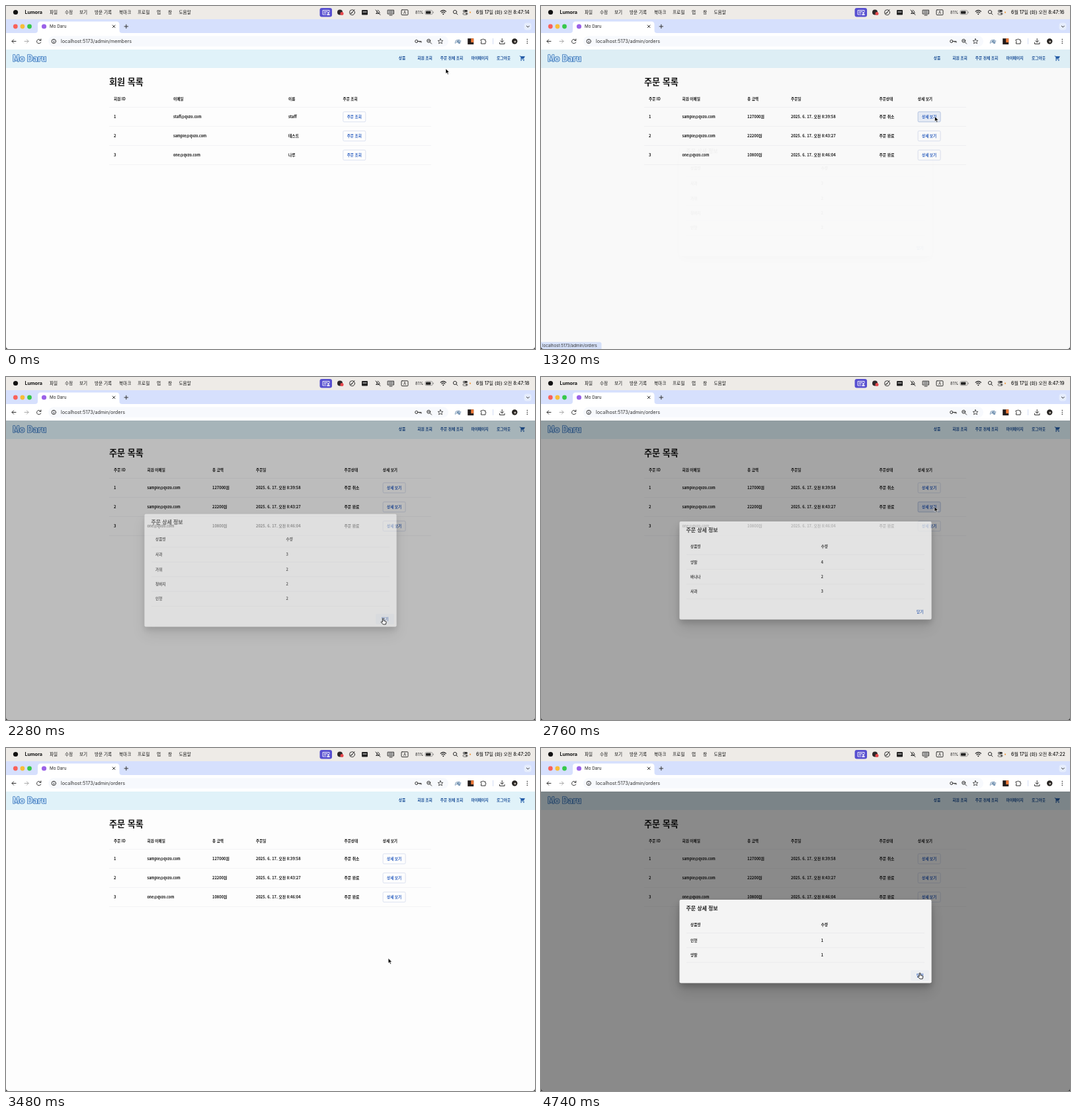
Write an HTML page that moves like this. It is 800 by 520 pixels and loops after 4800 ms.

```html
<!DOCTYPE html>
<html lang="ko">
<head>
<meta charset="utf-8">
<title>Mo Daru</title>
<style>
  html, body { margin: 0; width: 800px; height: 520px; overflow: hidden; background: #fdfdfd; }
  svg { display: block; }
  text { font-family: Inter, "Noto Sans CJK KR", "Noto Sans CJK", sans-serif; white-space: pre; }
  .page text { font-family: "Noto Sans CJK KR", "Noto Sans CJK", sans-serif; font-weight: 700; }
  .line { fill: none; stroke: #333; stroke-width: 1; stroke-linecap: round; stroke-linejoin: round; }
</style>
</head>
<body>
<svg id="stage" width="800" height="520" viewBox="0 0 800 520"></svg>
<script>
const LOOP = 4800, STEP = 60;
const BLUE = '#2b5fc0', INK = '#151515';

// Markup helpers; text is centred vertically on y.
const text = (x, y, s, size, fill = INK, extra = '') =>
  `<text x="${x}" y="${y + size * 0.36}" font-size="${size}" fill="${fill}" ${extra}>${s}</text>`;
const rect = (x, y, w, h, fill, extra = '') =>
  `<rect x="${x}" y="${y}" width="${w}" height="${h}" fill="${fill}" ${extra}/>`;
const dot = (x, y, r, fill) => `<circle cx="${x}" cy="${y}" r="${r}" fill="${fill}"/>`;
const ring = (x, y, r) => `<circle class="line" cx="${x}" cy="${y}" r="${r}"/>`;
const line = (d, extra = '') => `<path class="line" d="${d}" ${extra}/>`;
const rule = (x, y, w) => rect(x, y - 0.4, w, 0.8, '#f2f2f4');
const MID = 'text-anchor="middle"';

const menuBar = () => {
  const items = [[66, '파일'], [89, '수정'], [111, '보기'], [134, '방문 기록'], [171, '북마크'],
    [199, '프로필'], [228, '탭'], [245, '창'], [261.5, '도움말']];
  return rect(0, 0, 800, 20, '#eeebe7') + dot(14.5, 9.5, 3.6, '#111') +
    text(28.5, 9.7, 'Lumora', 7.2, '#111', 'font-weight="700"') +
    items.map(([x, s]) => text(x, 9.7, s, 6.6, '#111', 'font-weight="500"')).join('') +
    rect(474.5, 3, 18.5, 13.5, '#574fd0', 'rx="3"') +
    line('M484 13H479V6.5H489V9M481 8.5H486M481 10.5H484', 'style="stroke:#fff;stroke-width:.9"') +
    dot(487.5, 10.5, 1.3, '#fff') + rect(485.2, 12.2, 4.6, 1.8, '#fff', 'rx=".9"') +
    dot(505, 9.5, 4, '#2d2728') + dot(508, 11.5, 2.5, '#e5484d') +
    ring(523.5, 9.7, 4) + line('M522 11.5L527 5.5M521 11L524 10') +
    rect(538, 6, 9, 7.5, '#222', 'rx="1"') + rect(539.5, 8.5, 6, 1, '#eee') +
    line('M560 7L564 11.5H559.5L561 10V8M562 6.5Q565 6.5 565 11M559 6L566 13.5') +
    line('M577.5 6.2H586.5V12H577.5ZM580 14H584') +
    rect(578.5, 7, 7, 4, '#999') +
    line('M599 5.8H607Q608 5.8 608 7V12.5Q608 13.6 607 13.6H599Q598 13.6 598 12.5V7Q598 5.8 599 5.8Z', 'stroke-width=".8"') +
    text(603, 9.7, 'A', 6, '#222', MID) +
    text(619, 9.7, '81%', 6, '#222') +
    rect(634, 6.7, 11, 6, 'none', 'rx="1.7" stroke="#777" stroke-width=".7"') +
    rect(635, 7.7, 7.4, 4, '#222', 'rx=".8"') + rect(645.6, 8.7, 1, 2, '#777') +
    line('M657.2 8.2Q661.3 4.8 665.4 8.2M658.9 10.2Q661.3 8.2 663.7 10.2', 'style="stroke-width:1.3"') + dot(661.3, 12.2, 1, '#222') +
    ring(679, 9, 2.6) + line('M681 11L683 13') +
    rect(691, 6, 7, 3, '#333', 'rx="1.5"') + dot(692.7, 7.5, 0.8, '#fff') +
    rect(691, 10.2, 7, 3, 'none', 'rx="1.5" stroke="#333" stroke-width=".7"') + dot(696.3, 11.7, 1, '#333') +
    dot(702, 9.7, 1.1, '#f09a3e');
};

const browserBar = () =>
  rect(0, 20, 800, 22, '#d6e0fd') + rect(0, 41, 800, 25, '#fff') +
  rect(64, 45.5, 605, 16, '#f7f9fd', 'rx="8"') +
  ['#f9615a', '#f8bd38', '#36c84b'].map((c, i) => dot(14.3 + i * 10.6, 31, 3.4, c)).join('') +
  '<path d="M44 41Q48 41 48 37V28Q48 23.5 52.5 23.5H167Q171.5 23.5 171.5 28V37Q171.5 41 175.5 41Z" fill="#fff"/>' +
  dot(57.5, 31, 3.6, '#9b62e8') +
  text(66, 31, 'Mo Daru', 6.3, '#222') +
  line('M161.2 29L165 32.8M165 29L161.2 32.8M179 31H184.6M181.8 28.2V33.8') +
  rect(783.5, 25.5, 11, 11, '#e6edfd', 'rx="4"') + line('M787.3 30.2L789.3 32.2 791.3 30.2') +
  line('M15 53.5H9M11.6 50.8L9 53.5 11.6 56.2') +
  line('M28 53.5H34M31.4 50.8L34 53.5 31.4 56.2', 'style="stroke:#aaa"') +
  line('M52.5 52A3.2 3.2 0 1 0 52.7 55M52.9 50V52.3H50.6') +
  ring(72.3, 53.5, 3.2) + line('M72.3 53.4V55.2M72.3 51.7V51.8') +
  ring(620.8, 53.5, 2.1) + line('M623 53.5H628V55.3M626 53.5V55') +
  ring(639.2, 52.8, 2.5) + line('M641.2 54.8L643.6 57.2M638 52.8H640.4') +
  line('M657 49.6L658.1 52.2 660.9 52.4 658.8 54.2 659.5 57 657 55.5 654.5 57 655.2 54.2 653.1 52.4 655.9 52.2Z', 'style="stroke-width:.8"') +
  text(683.5, 53.5, '/제/', 5.6, '#35628f', MID + ' font-weight="700"') +
  rect(698.2, 49.2, 9, 9, '#231c1b') + rect(703.2, 49.2, 4, 6, '#ee7a3a') +
  line('M718.5 51H720.5Q721.5 48.5 722.7 51H725V53Q727.2 54 725 55.2V57.2H718.5V55Q720.5 54 718.5 53Z') +
  rect(736, 49, 0.8, 9, '#c8d6f2') +
  line('M750.2 49.5V54.8M747.8 52.7L750.2 55 752.6 52.7M746.5 55.5V57.5H754V55.5') +
  dot(769.2, 53.5, 4.2, '#272422') + dot(769.8, 54, 1.6, '#b9b1a9') +
  [50.6, 53.5, 56.4].map(y => dot(788.3, y, 0.8, '#333')).join('');

const siteHeader = () => {
  const links = [[599, '상품'], [633.5, '회원 조회'], [674, '주문 전체 조회'], [716.5, '마이페이지'], [752.5, '로그아웃']];
  return rect(0, 66, 800, 28, '#e0f2f9') +
    text(10, 80, 'Mo Daru', 12.4, '#d3eafb',
      'style="font-weight:700" stroke="#3b78bd" stroke-width="1.7" paint-order="stroke" stroke-linejoin="round"') +
    links.map(([x, s]) => text(x, 79.3, s, 5.7, '#1b4f98', MID + ' style="font-weight:900"')).join('') +
    '<path transform="translate(776.3 74.6) scale(.39)" fill="#1d57a5" d="M7 18a2 2 0 1 0 0 4 2 2 0 0 0 0-4M1 2v2h2l3.600 7.600-1.400 2.400C4.500 15.400 5.500 17 7 17h12v-2H7.400l1.100-2h7.500c.7 0 1.400-.4 1.700-1L21.600 5.500A1 1 0 0 0 20.700 4H5.200L4.300 2zM17 18a2 2 0 1 0 0 4 2 2 0 0 0 0-4"/>';
};

const ROW_Y = [168, 197, 226];
const listPage = (id, title, xs, heads, rows, action) => {
  const buttonX = xs[xs.length - 1];
  return `<g id="${id}">` + text(156, 114.8, title, 13.1) +
    heads.map((s, i) => text(xs[i], 141.3, s, 5.6)).join('') + rule(156, 153.5, 487) +
    rows.map((row, r) =>
      row.map((s, i) => text(xs[i], ROW_Y[r], s, s.includes('@') ? 5.4 : 5.8)).join('') +
      rect(buttonX + 0.3, ROW_Y[r] - 7.7, 34, 15.4, '#fdfdfd', 'rx="1.8" stroke="#d3dbee" stroke-width=".8" class="button"') +
      text(buttonX + 17.3, ROW_Y[r], action, 5.6, BLUE, MID) +
      rule(156, ROW_Y[r] + 14.5, 487)).join('') + '</g>';
};

const DIALOGS = [
  { open: 1305, close: 2240, items: [['사과', 3], ['가위', 2], ['청바지', 2], ['인형', 2]] },
  { open: 2700, close: 3290, items: [['양말', 4], ['바나나', 2], ['사과', 3]] },
  { open: 3840, close: 4720, items: [['인형', 1], ['양말', 1]] },
];
const dialogBox = ({ items }) => {
  const h = 81.6 + 22.3 * items.length, top = 293.2 - h / 2;
  const rowY = i => top + 61.6 + 22.3 * i;
  return '<g class="dialog">' +
    rect(209.5, top, 381, h, '#fff', 'rx="2" filter="url(#shadow)"') +
    text(219.5, top + 12.8, '주문 상세 정보', 7.9) +
    text(226, top + 38.2, '상품명', 5.6) + text(423.5, top + 38.2, '수량', 5.6) + rule(220, top + 50.3, 360) +
    items.map(([name, count], i) =>
      text(226, rowY(i), name, 5.6) + text(423.5, rowY(i), count, 5.8) + rule(220, rowY(i) + 11.1, 360)).join('') +
    rect(559, top + h - 19.5, 28, 16, '#f5f8fd', 'rx="2" class="closeHover"') +
    text(573.3, top + h - 11.6, '닫기', 5.7, BLUE, MID) + '</g>';
};

const stage = document.getElementById('stage');
stage.innerHTML = `
  <defs><filter id="shadow" x="-20%" y="-30%" width="140%" height="170%">
    <feDropShadow dx="0" dy="5" stdDeviation="4" flood-opacity=".22"/>
    <feDropShadow dx="0" dy="11" stdDeviation="10" flood-opacity=".16"/>
  </filter></defs>` +
  rect(0, 0, 800, 520, '#fdfdfd') +
  '<g class="page">' + siteHeader() +
  listPage('members', '회원 목록', [163, 253, 427, 509.5], ['회원 ID', '이메일', '이름', '주문 조회'],
    [['1', 'staff@qvzo.com', 'staff'], ['2', 'sample@qvzo.com', '테스트'], ['3', 'one@qvzo.com', '나루']], '주문 조회') +
  listPage('orders', '주문 목록', [163, 213.5, 312, 378, 511.5, 569.8],
    ['주문 ID', '회원 이메일', '총 금액', '주문일', '주문상태', '상세 보기'],
    [['1', 'sample@qvzo.com', '127000원', '2025. 6. 17. 오전 8:39:58', '주문 취소'],
     ['2', 'sample@qvzo.com', '22200원', '2025. 6. 17. 오전 8:43:27', '주문 완료'],
     ['3', 'one@qvzo.com', '10800원', '2025. 6. 17. 오전 8:46:04', '주문 완료']], '상세 보기') +
  rect(0, 66, 800, 454, '#000', 'id="backdrop"') + DIALOGS.map(dialogBox).join('') + '</g>' +
  menuBar() + browserBar() +
  text(83, 53.6, '', 7.25, '#333', 'id="address"') + text(711, 9.7, '', 7, '#111', 'id="clock" font-weight="500"') +
  '<g id="status"><path d="M0 509.500H88.500Q91.500 509.500 91.500 512.500V520H0Z" fill="#d5e0f8"/>' +
  text(2, 515, 'localhost:5173/admin/orders', 6.2, '#333') + '</g>' +
  '<path d="M0 516Q0 520 4 520H0ZM800 516Q800 520 796 520H800Z" fill="#333"/>' +
  `<g id="cursor"><path id="arrow" d="M0 0V7.600L1.800 6 3 8.900 4.300 8.300 3.100 5.600H5.500Z" fill="#000" stroke="#fff" stroke-width=".6"/>
   <path id="hand" d="M-.9 .9A.9 .9 0 0 1 .9 .9V3.600L3.800 4.300Q5 4.700 4.700 6L4 9H0L-3 5.800C-3.200 4.800 -2 4.400 -.9 5.600Z" fill="#fff" stroke="#000" stroke-width=".8" stroke-linejoin="round"/></g>`;

const get = id => document.getElementById(id);
const dialogs = [...stage.querySelectorAll('.dialog')];
const closeHovers = [...stage.querySelectorAll('.closeHover')];
const orderButtons = [...get('orders').querySelectorAll('.button')];
const show = (node, on) => node.setAttribute('visibility', on ? 'visible' : 'hidden');

// cubic-bezier(.4, 0, .2, 1)
const ease = x => {
  if (x <= 0) return 0;
  if (x >= 1) return 1;
  let lo = 0, hi = 1;
  for (let i = 0; i < 18; i++) {
    const s = (lo + hi) / 2, r = 1 - s;
    if (1.2 * s * r * r + 0.6 * s * s * r + s ** 3 < x) lo = s; else hi = s;
  }
  return 3 * lo * lo * (1 - lo) + lo ** 3;
};

// Each move: start, end, destination.
const START = [665, 95];
const MOVES = [
  [290, 480, 672, 78], [820, 1110, 595.5, 167.5], [1830, 2160, 570.3, 366],
  [2340, 2660, 595, 196.5], [2870, 3190, 572, 353], [3360, 3715, 595, 224],
  [3970, 4400, 573, 341],
];
const cursorAt = t => {
  let [x, y] = START;
  for (const [from, to, tx, ty] of MOVES) {
    const p = Math.min(1, Math.max(0, (t - from) / (to - from)));
    const k = p * p * (3 - 2 * p);
    x += (tx - x) * k;
    y += (ty - y) * k;
  }
  return [x, y];
};

const inside = (x, y, node) => {
  const [l, t, w, h] = ['x', 'y', 'width', 'height'].map(a => +node.getAttribute(a));
  return x >= l && x <= l + w && y >= t && y <= t + h;
};

function render(time) {
  const t = Math.floor((time % LOOP) / STEP) * STEP;
  const [x, y] = cursorAt(t);
  const onOrders = t >= 660;
  show(get('members'), !onOrders);
  show(get('orders'), onOrders);
  get('address').textContent = 'localhost:5173/admin/' + (onOrders ? 'orders' : 'members');
  get('clock').textContent = '6월 17일 (화) 오전 8:47:' + Math.floor(14.45 + t / 600);

  let shade = 0, hand = y < 84;
  DIALOGS.forEach(({ open, close }, i) => {
    const alpha = ease((t - open) / 135) * (1 - ease((t - close) / 117));
    const over = inside(x, y, closeHovers[i]) && alpha > 0;
    dialogs[i].setAttribute('opacity', alpha);
    show(dialogs[i], alpha > 0);
    closeHovers[i].setAttribute('opacity', over ? 1 : 0);
    shade = Math.max(shade, alpha);
    hand = hand || over;
  });
  get('backdrop').setAttribute('opacity', shade / 2);

  orderButtons.forEach(button => {
    const over = onOrders && inside(x, y, button) && shade < 0.95;
    button.setAttribute('fill', over ? '#e9eef8' : '#fdfdfd');
    button.setAttribute('stroke', over ? '#a9bbe0' : '#d3dbee');
    hand = hand || over && shade === 0;
  });

  get('status').setAttribute('opacity', t < 1380 ? 1 : 0.7);
  show(get('status'), t >= 420 && t < 1560);
  get('cursor').setAttribute('transform', `translate(${x.toFixed(2)} ${y.toFixed(2)})`);
  show(get('arrow'), !hand);
  show(get('hand'), hand);
}

const begin = performance.now();
const frame = () => {
  render(performance.now() - begin);
  requestAnimationFrame(frame);
};
frame();
</script>
</body>
</html>
```
